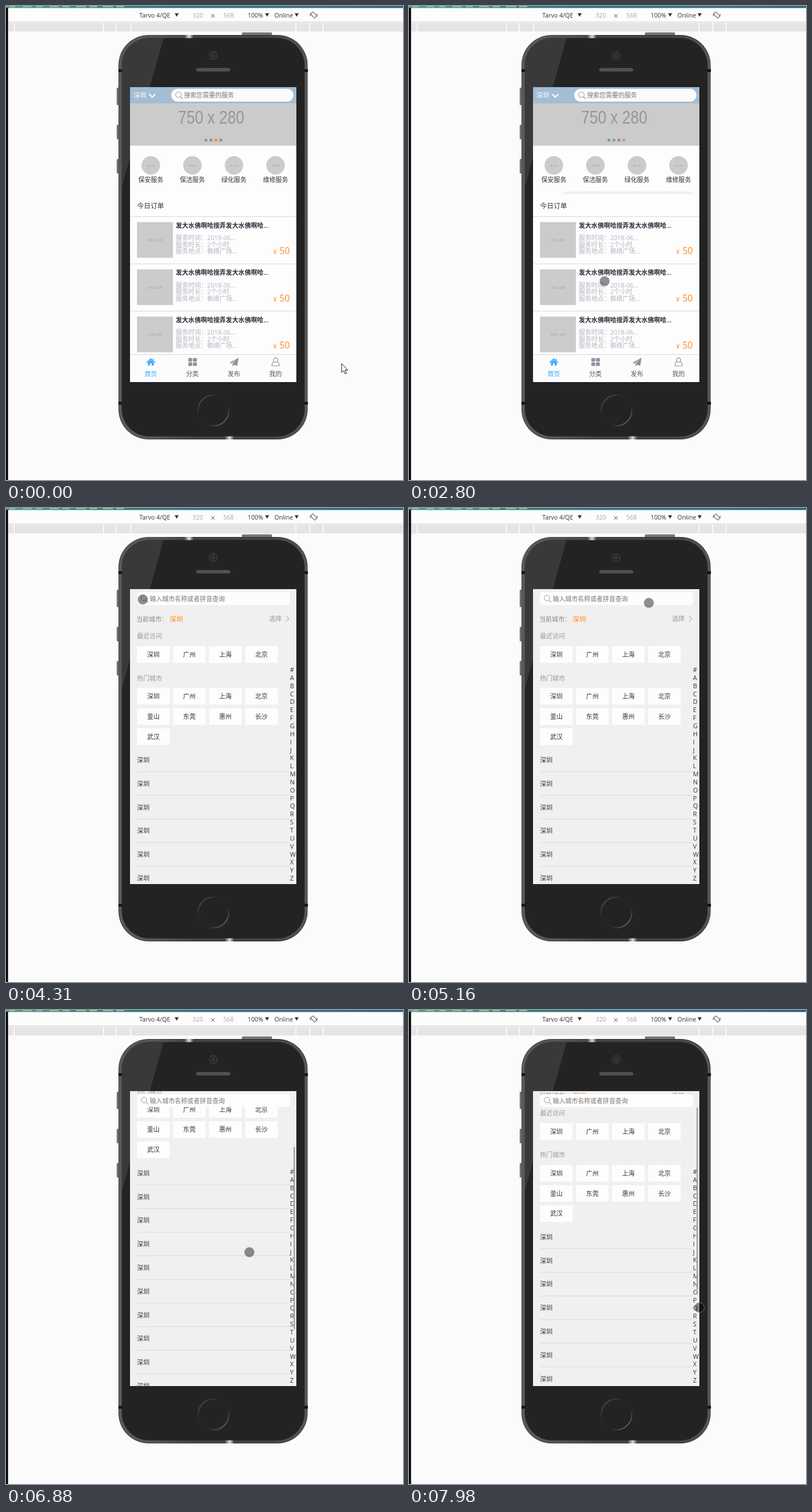
Recreate the animation shown at these times as an HTML page. Size 685x818 px, loop 8 s.

```html
<!DOCTYPE html>
<html lang="zh-CN">
<head>
<meta charset="utf-8">
<title>City picker</title>
<style>
html, body { margin: 0; width: 100%; height: 100%; overflow: hidden; background: #fbfbfb; }
svg { display: block; width: 685px; height: 818px; }
text { font-family: "Open Sans", "Noto Sans CJK SC", "Noto Sans CJK", sans-serif; white-space: pre; }
.arial { font-family: "Liberation Sans", Arial, sans-serif; }
</style>
</head>
<body>
<svg id="stage" viewBox="0 0 685 818" xmlns="http://www.w3.org/2000/svg"></svg>
<script>
const LOOP = 8000;
const TICK = 140;
const SIZE = 10.8;
const LEFT = 214, TOP = 140, WIDTH = 287, HEIGHT = 509;
const COLUMN = WIDTH / 4;

const rect = (x, y, w, h, fill, rx = 0) =>
  `<rect x="${x}" y="${y}" width="${w}" height="${h}" fill="${fill}" rx="${rx}"/>`;
const circle = (x, y, r, attrs) => `<circle cx="${x}" cy="${y}" r="${r}" ${attrs}/>`;
const path = (d, attrs) => `<path d="${d}" ${attrs}/>`;
const line = (d, color, width = 1) =>
  path(d, `fill="none" stroke="${color}" stroke-width="${width}"`);
const text = (x, y, s, fill = '#333', size = SIZE, attrs = '') =>
  `<text x="${x}" y="${y}" fill="${fill}" font-size="${size}" ${attrs}>${s}</text>`;
const centered = (x, y, s, fill, size = SIZE, attrs = '') =>
  text(x, y, s, fill, size, `text-anchor="middle" ${attrs}`);
const at = (x, y, inner, attrs = '') => `<g transform="translate(${x} ${y})" ${attrs}>${inner}</g>`;
const group = (id, inner) => `<g id="${id}">${inner}</g>`;
const each = (list, fn) => list.map(fn).join('');
const range = (n, fn) => Array.from({ length: n }, (_, i) => fn(i)).join('');
const columnX = i => LEFT + COLUMN * (i + .5);
const magnifier = (x, y) => at(x, y,
  circle(0, 0, 4.8, 'fill="none" stroke="#999"') + line('M3.5 3.5l4 4', '#999', 1.1));

function defs() {
  const gradient = (id, colors, attrs = '') => `<linearGradient id="${id}" ${attrs}>` +
    each(colors, (c, i) => `<stop offset="${i / (colors.length - 1)}" stop-color="${c}"/>`) + '</linearGradient>';
  const clip = (id, shape) => `<clipPath id="${id}">${shape}</clipPath>`;
  return '<defs>' +
    gradient('sky', ['#4d9c8c', '#2f8077', '#2b7389', '#346f92', '#2b6380']) +
    gradient('rim', ['#505458', '#4b4e51', '#3b3839', '#3b3839', '#3b3839', '#4b4f54']) +
    gradient('shine', ['#4b4e51', '#dcdcdc', '#3b3839']) +
    gradient('ring', ['#606060', '#262626', '#262626', '#808080'], 'x2="1" y2="1"') +
    `<pattern id="mesh" width="3" height="3" patternUnits="userSpaceOnUse">
      ${rect(0, 0, 3, 3, '#3b3b3b')}${rect(0, 0, 1.5, 1.5, '#666')}${rect(1.5, 1.5, 1.5, 1.5, '#666')}</pattern>` +
    clip('screen', rect(LEFT, TOP, WIDTH, HEIGHT)) +
    clip('banner', rect(LEFT, 168, WIDTH, 73)) +
    clip('glass', rect(200, 55.5, 315, 687, '#000', 47)) + '</defs>';
}

function toolbar() {
  const dropdown = (x, s, arrowX) =>
    text(x, 19.5, s, '#333', 10.5) + path(`M${arrowX} 12.5h7l-3.500 6z`, 'fill="#333"');
  const rotate = `<g transform="translate(531 15.500) rotate(-45)" fill="none" stroke="#555">
    <rect x="-2.800" y="-5" width="5.600" height="10" rx="1"/>
    <path d="M-5.500 -2.500A6 6 0 0 1 -1 -6M5.500 2.500A6 6 0 0 1 1 6"/></g>`.replaceAll('00"', '"');
  return rect(0, 0, 685, 4, 'url(#sky)') +
    range(9, i => rect(6 + i * 23, 0, 10 + i * 5 % 9, 2, '#8cc0a4')) +
    rect(0, 3.5, 685, 24, '#fdfdfd') + rect(0, 27, 685, 1, '#cfcfcf') +
    rect(4, 29, 681, 15, '#e5e5e5') +
    each([14, 168, 190, 215, 500, 524, 547], x => rect(x - .5, 29, 1.5, 15, '#fff')) +
    rect(0, 3, 3.5, 815, '#000') +
    dropdown(230, 'Tarvo 4/QE', 291) +
    text(322, 19.5, '320', '#a8a8a8', 10.5) + line('M354 14l6 6m0 -6l-6 6', '#555') +
    text(375, 19.5, '568', '#a8a8a8', 10.5) +
    dropdown(417, '100%', 447) + dropdown(463, 'Online', 498) + rotate;
}

function phone() {
  const antenna = y => rect(194, y, 6, 5, '#161616') + rect(515, y, 6, 5, '#161616');
  const button = (y, h) => rect(191, y, 6, h, '#707375', 1.5);
  return rect(407, 45.5, 52, 8, '#747677', 1.5) + button(141, 30) + button(205, 25) + button(264, 25) +
    rect(194, 50, 326.5, 698, 'url(#rim)', 52) +
    '<rect x="197" y="53" width="320.5" height="692" rx="49.5" fill="none" stroke="#737a82" stroke-opacity=".55"/>' +
    rect(308, 50, 16, 6, 'url(#shine)') + rect(378, 742, 16, 6, 'url(#shine)') + antenna(109) + antenna(683) +
    rect(200, 55.5, 315, 687, '#232323', 47) +
    path('M200 55H272L199 315z', 'fill="#393939" clip-path="url(#glass)"') +
    circle(357.5, 85.5, 6.5, 'fill="#1d1d22" stroke="#47474f" stroke-width="1.3"') +
    circle(357.5, 85.5, 3, 'fill="#2a2a38" stroke="#55555f"') +
    rect(328, 107, 59, 6, 'url(#mesh)', 3) +
    circle(358, 698, 26.5, 'fill="none" stroke="url(#ring)" stroke-width="2"');
}

function order(i) {
  const details = ['服务时间：2018-06...', '服务时长：2个小时', '服务地点：枫络广场...'];
  return at(0, i * 81.5,
    rect(LEFT, 363, WIDTH, 1, '#dadada') + rect(226, 373, 62, 61.5, '#cbcbcb') +
    centered(257, 406, '170 x 170', '#999', 5.5, 'class="arial"') +
    text(293, 382.5, '发大水佛啊哈搜弄发大水佛啊哈...', '#2b2f3b', SIZE, 'font-weight="600"') +
    each(details, (s, n) => text(293, 404 + n * 11.7, s, '#b4b4c1')) +
    text(461, 428, '¥', '#ff8b1e', 10.5) + text(472, 428, '50', '#ff8b1e', 15.5));
}

function tabs() {
  const gray = '#8f929e', blue = '#3da7f8';
  const icons = [
    line('M-7 1L0 -5.5L7 1', blue, 1.8) + path('M-5 1L0 -3.5L5 1V6H1.5V2H-1.5V6H-5zM3 -6h2v4z', `fill="${blue}"`),
    range(4, i => rect(-7 + i % 2 * 8, -7 + (i >> 1) * 7.5, 6.7, 6.2, gray, 1.3)),
    path('M8 -7.5L5.5 6.5L.5 4.5L-2.5 7.5V3L4.500 -5L-4 2.5L-7.5 1z', `fill="${gray}"`),
    `<g fill="none" stroke="${gray}" stroke-width="1.2">` + circle(0, -3.5, 3.8, '') +
      path('M-3 -.5Q-6.5 1 -6.200 6.5H6.200Q6.500 1 3 -.5', '') + '</g>'
  ];
  return rect(LEFT, 601, WIDTH, 48, '#fcfcfc') + rect(LEFT, 601, WIDTH, 1, '#d8d8d8') +
    each(['首页', '分类', '发布', '我的'], (s, i) =>
      at(columnX(i), 614.5, icons[i]) + centered(columnX(i), 638.5, s, i ? '#555866' : blue));
}

function home() {
  const slide = x => at(x, 203,
    '<text class="arial" transform="scale(1 1.18)" font-size="26" fill="#969696">750 x 280</text>');
  const service = (s, i) => circle(columnX(i), 275, 16, 'fill="#cbcbcb"') +
    centered(columnX(i), 276.5, '88 x 88', '#969696', 3.8, 'class="arial"') + centered(columnX(i), 303.5, s, '#333');
  return rect(LEFT, TOP, WIDTH, HEIGHT, '#fdfdfd') + rect(LEFT, TOP, WIDTH, 28, '#a3bdd4') +
    text(220, 158, '深圳', '#fff', 11, 'font-weight="500"') + line('M247 152l5.3 5.3l5.3 -5.3', '#fff', 2) +
    rect(285, 143, 211, 22, '#fbfbfb', 11) + magnifier(297.5, 153) + text(307, 157.5, '搜索您需要的服务', '#777') +
    rect(LEFT, 168, WIDTH, 73, '#cbcbcb') +
    `<g clip-path="url(#banner)">${group('slides', slide(297) + slide(297 + WIDTH))}</g>` +
    range(4, i => circle(345 + i * 8.6, 231.5, 2.5, 'class="dot"')) +
    each(['保安服务', '保洁服务', '绿化服务', '维修服务'], service) +
    group('divider', rect(267, 320, 223, 5, '#f0f0f0')) +
    text(226, 349, '今日订单', '#333', 11.7) + range(3, order) + tabs();
}

function cities() {
  const names = ['深圳', '广州', '上海', '北京', '釜山', '东莞', '惠州', '长沙', '武汉'];
  const grid = (list, top) => each(list, (s, i) => at(226 + i % 4 * 62.2, top + (i >> 2) * 34.9,
    rect(0, 0, 56.3, 28.7, '#fdfdfd') + centered(28.2, 18.4, s, '#333')));
  const content =
    text(225, 195.5, '当前城市：', '#888') + text(282, 195.5, '深圳', '#ff8519', 11.7) +
    text(454, 195, '选择', '#999') + line('M483 186l5 5l-5 5', '#999') +
    text(226, 225, '最近访问', '#999') + grid(names.slice(0, 4), 238.5) +
    text(226, 297.5, '热门城市', '#999') + grid(names, 310.5) +
    range(13, i => at(226, 439 + i * 40.8, text(0, 0, '深圳') + rect(0, 15.5, 264, 1, '#dadada')));
  return rect(LEFT, TOP, WIDTH, HEIGHT, '#f0f0f0') + group('scroll', content) +
    rect(226, 145, 264, 22.5, '#fdfdfd', 5) + magnifier(238, 155.3) +
    text(248, 160.5, '输入城市名称或者拼音查询', '#777') +
    each([...'#ABCDEFGHIJKLMNOPQRSTUVWXYZ'], (c, i) => text(490, 283 + i * 13.85, c)) +
    group('bar', rect(496, 141.5, 2.8, 314.5, '#a9a9ad', 1.4));
}

document.getElementById('stage').innerHTML =
  defs() + rect(0, 0, 685, 818, '#fbfbfb') + toolbar() + phone() +
  `<g clip-path="url(#screen)">${group('home', home())}${group('cities', cities())}</g>` +
  group('arrow', path('M0 0V15.5L3.6 12.2L6 17.8L8.4 16.8L6 11.3H10.8z', 'fill="#fff" stroke="#1a1a1a"')) +
  group('touch', circle(0, 0, 8.5, 'fill="#000" fill-opacity=".44" stroke="#aaa" stroke-opacity=".55"'));

const parts = Object.fromEntries(['home', 'cities', 'slides', 'divider', 'scroll', 'bar', 'arrow', 'touch']
  .map(id => [id, document.getElementById(id)]));
const dots = [...document.querySelectorAll('.dot')];

const clamp = x => Math.min(1, Math.max(0, x));
const smooth = p => p * p * (3 - 2 * p);

// Each leg eases from wherever the last one ended to its own goal.
const follow = (start, legs, t) => legs.reduce((pos, { from, to, goal }) => {
  const p = smooth(clamp((t - from) / (to - from)));
  return pos.map((v, i) => v + (goal[i] - v) * p);
}, start);

const pointerLegs = [
  { from: 0, to: 380, goal: [470, 690] },
  { from: 380, to: 640, goal: [267, 677] },
  { from: 1830, to: 2260, goal: [250, 629] },
  { from: 2300, to: 2800, goal: [337.5, 475] },
  { from: 2800, to: 3380, goal: [222, 206] },
  { from: 3500, to: 4010, goal: [236, 158] },
  { from: 4310, to: 5320, goal: [455, 165] },
  { from: 5320, to: 5880, goal: [393, 270] },
  { from: 5880, to: 6160, goal: [415.5, 352.5] },
  { from: 6160, to: 6430, goal: [420, 418] },
  { from: 7000, to: 7980, goal: [501, 513.5] }
];

const scrollLegs = [
  { from: 6600, to: 6860, goal: [153.3] },
  { from: 7280, to: 7980, goal: [43.2] }
];

// CSS "ease": cubic-bezier(.25, .1, .25, 1)
function ease(x) {
  const bezier = (a, b, s) => 3 * a * s * (1 - s) ** 2 + 3 * b * s * s * (1 - s) + s ** 3;
  let low = 0, high = 1;
  for (let i = 0; i < 24; i++) {
    const mid = (low + high) / 2;
    if (bezier(.25, .25, mid) < x) low = mid; else high = mid;
  }
  return bezier(.1, 1, low);
}

const show = (node, on) => node.setAttribute('display', on ? 'inline' : 'none');
const move = (node, x, y) => node.setAttribute('transform', `translate(${x.toFixed(2)} ${y.toFixed(2)})`);

function render(time) {
  const t = Math.floor(time / TICK) * TICK;
  const picking = time >= 4310, touching = time >= 2260, turned = time >= 1260;

  show(parts.home, !picking);
  show(parts.cities, picking);
  show(parts.divider, turned);
  move(parts.slides, -WIDTH * ease(clamp((t - 1321) / 500)), 0);
  dots.forEach((dot, i) => dot.setAttribute('fill', i === (turned ? 3 : 2) ? '#fb8a55' : '#8f8f8f'));

  const [scrolled] = follow([0], scrollLegs, t);
  move(parts.scroll, 0, -scrolled);
  move(parts.bar, 0, scrolled * .618);
  show(parts.bar, scrolled > 0);

  const [x, y] = follow([579, 617], pointerLegs, t);
  show(parts.arrow, !touching);
  show(parts.touch, touching);
  move(touching ? parts.touch : parts.arrow, x, y);
}

function frame() {
  render(performance.now() % LOOP);
  requestAnimationFrame(frame);
}
frame();
</script>
</body>
</html>
```
